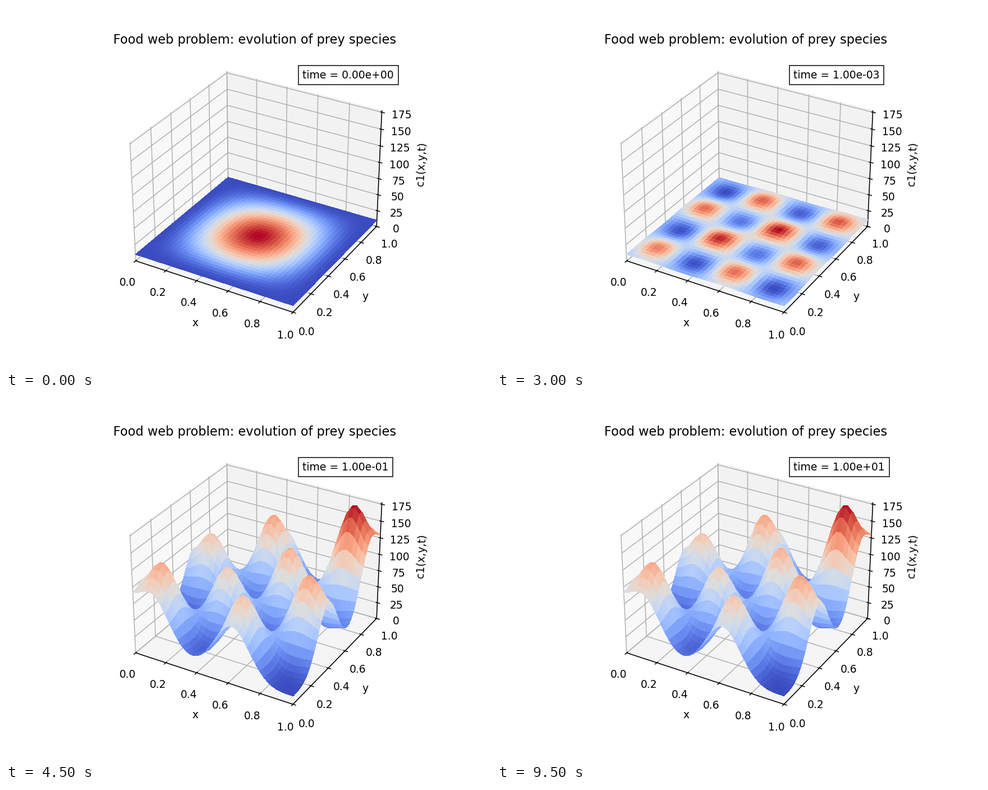
A matplotlib script that plays this animation: 864 by 648 pixels, repeating every 10 s.

```python
import numpy as np
import matplotlib.pyplot as plt
from matplotlib.animation import FuncAnimation

N = 40             # mesh points per side
ALPHA, BETA = 50, 300
CROWDING = 1.005   # prey self-limitation plus the fast predator response
MAX_STEP = 1e-4

TIMES = [0, *(10.0 ** k for k in range(-8, -1)), 1.25e-2, 0.1, *range(1, 11)]
STEADY_AFTER = 0.4

axis = np.linspace(0, 1, N)
X, Y = np.meshgrid(axis, axis)
growth = 1 + ALPHA * X * Y + BETA * np.sin(4 * np.pi * X) * np.sin(4 * np.pi * Y)


def rate(c):
    """Diffusion with no-flux walls plus logistic growth."""
    p = np.pad(c, 1, mode="reflect")
    neighbours = p[2:, 1:-1] + p[:-2, 1:-1] + p[1:-1, 2:] + p[1:-1, :-2]
    return (neighbours - 4 * c) * (N - 1) ** 2 + c * (growth - CROWDING * c)


def advance(c, span):
    steps = int(np.ceil(span / MAX_STEP - 1e-9))
    for _ in range(steps):
        h = span / steps
        k1 = rate(c)
        k2 = rate(c + h / 2 * k1)
        k3 = rate(c + h / 2 * k2)
        k4 = rate(c + h * k3)
        c = c + h / 6 * (k1 + 2 * k2 + 2 * k3 + k4)
    return c


def solve():
    c = 10 + (16 * X * (1 - X) * Y * (1 - Y)) ** 2
    states, now = [], 0
    for t in TIMES:
        target = min(t, STEADY_AFTER)
        c = advance(c, target - now)
        now = target
        states.append(c)
    return states


states = solve()

fig = plt.figure(figsize=(6.4, 4.8), dpi=135)
ax = fig.add_subplot(projection="3d")
ax.set_title("Food web problem: evolution of prey species")
ax.set(xlabel="x", ylabel="y", zlabel="c1(x,y,t)",
       xlim=(0, 1), ylim=(0, 1), zlim=(0, np.max(states)))
clock = fig.text(0.6116, 0.8012, "", bbox=dict(facecolor="white", alpha=0.8))
surface = None


def update(i):
    global surface
    if surface is not None:
        surface.remove()
    surface = ax.plot_surface(X, Y, states[i], cmap="coolwarm",
                              linewidth=0, antialiased=False)
    clock.set_text(f"time = {TIMES[i]:.2e}")
    return surface, clock


anim = FuncAnimation(fig, update, frames=len(TIMES), init_func=lambda: (),
                     interval=500, repeat=True, blit=False)
plt.show()
```
